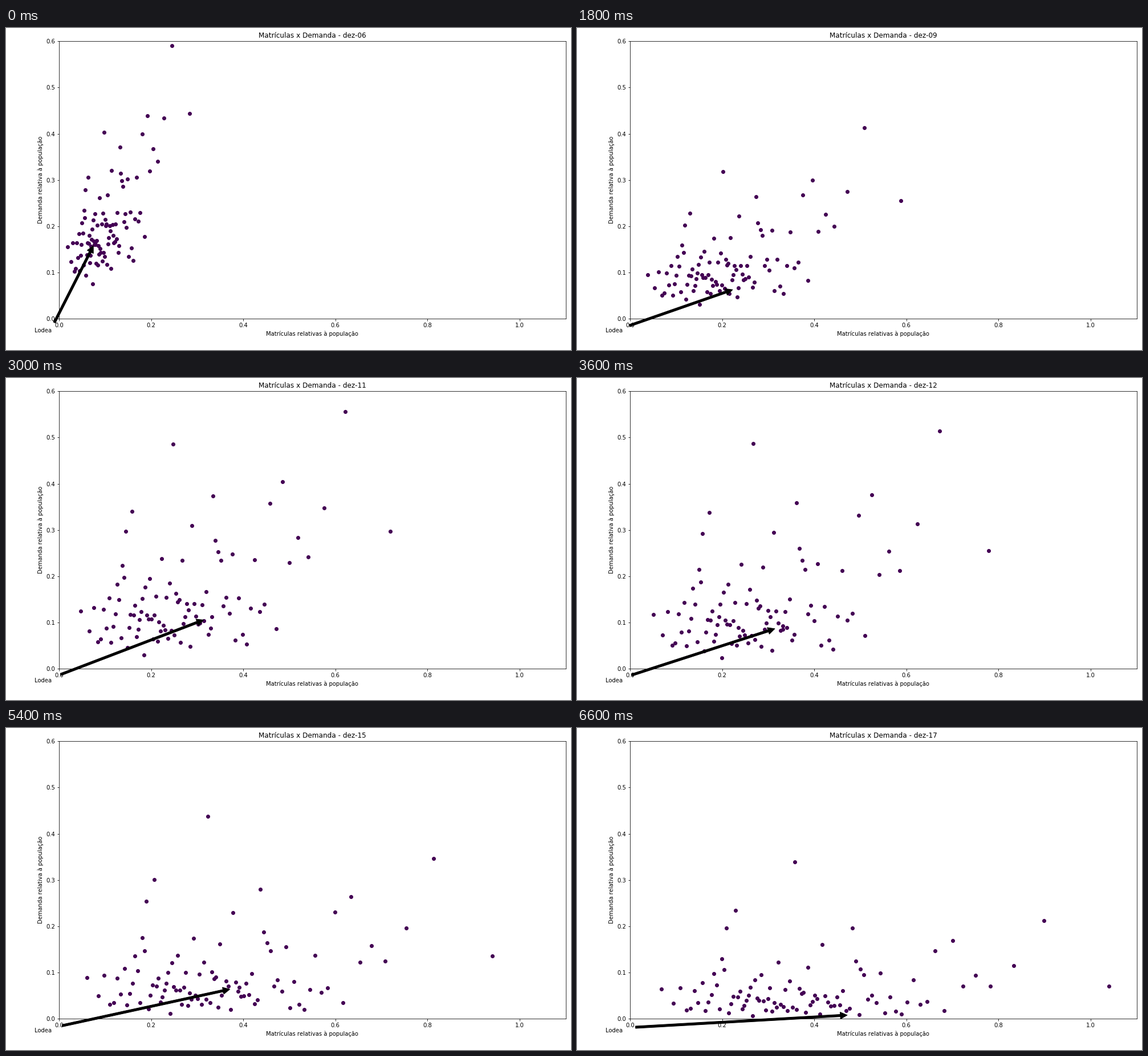
These frames come from a looping animation (991 px wide and 565 px high, 7.2 s). A matplotlib script:

```python
import numpy as np
import matplotlib.pyplot as plt
from matplotlib.animation import FuncAnimation

W, H, DPI = 991, 565, 72
FRAMES, INTERVAL = 12, 600
FIRST_YEAR, LAST_YEAR = 6, 17
DISTRICTS = 94
PLACE = "Lodea"

plt.rcParams["font.family"] = "DejaVu Sans"
plt.rcParams["text.kerning_factor"] = 6  # classic whole-pixel kerning

# Path of the highlighted district: year, enrolment, demand.
HOME = np.array([(6, .079, .167), (7, .150, .068), (9, .235, .067), (11, .331, .112),
                 (13, .332, .072), (15, .391, .068), (17, .497, .009)])

# Median demand at its turning points: year, value.
DEMAND = np.array([(6, .19), (7, .117), (9, .107), (11, .13), (17, .046)])

rng = np.random.default_rng(17)


def even_sample(values):
    """One value per district, spread evenly over the distribution."""
    return np.quantile(values, (np.arange(DISTRICTS) + .5) / DISTRICTS)


size = even_sample(rng.gamma(4, 1 / 4, 20000))
size_score = (size - size.mean()) / size.std()
noise = rng.permutation(even_sample(rng.normal(size=20000)))


def home(year):
    return tuple(np.interp(year, HOME[:, 0], col) for col in HOME[:, 1:].T)


def districts(year):
    """Enrolment grows and fans out while demand falls and decouples from it."""
    s = (year - FIRST_YEAR) / (LAST_YEAR - FIRST_YEAR)
    link = .6 - .5 * s
    spread = .38 + .4 * s
    score = link * size_score + np.sqrt(1 - link ** 2) * noise
    x = (.105 + .28 * s ** .7) * size
    y = np.interp(year, *DEMAND.T) * np.exp(spread * score)
    return np.vstack([np.column_stack([x, y]), home(year)])


fig = plt.figure(figsize=((W + .01) / DPI, (H + .01) / DPI), dpi=DPI, facecolor="white")
ax = fig.add_axes([93.3 / W, 1 - 510 / H, 888.2 / W, 486.7 / H])
ax.set(xlim=(0, 1.1), ylim=(0, .6),
       xlabel="Matrículas relativas à população",
       ylabel="Demanda relativa à população")
ax.set_xticks(np.arange(0, 1.1, .2))
title = ax.set_title("")
dots = ax.scatter([], [], s=36, color="#440154")
note = ax.annotate(PLACE, xy=home(FIRST_YEAR), xytext=(-.0165, -.03), ha="right",
                   arrowprops=dict(facecolor="black", shrink=.05))


def update(frame):
    year = FIRST_YEAR + frame
    title.set_text(f"Matrículas x Demanda - dez-{year:02d}")
    dots.set_offsets(districts(year))
    note.xy = home(year)
    return title, dots, note


anim = FuncAnimation(fig, update, frames=FRAMES, interval=INTERVAL,
                     init_func=lambda: update(0), repeat=True, repeat_delay=0)
plt.show()
```
